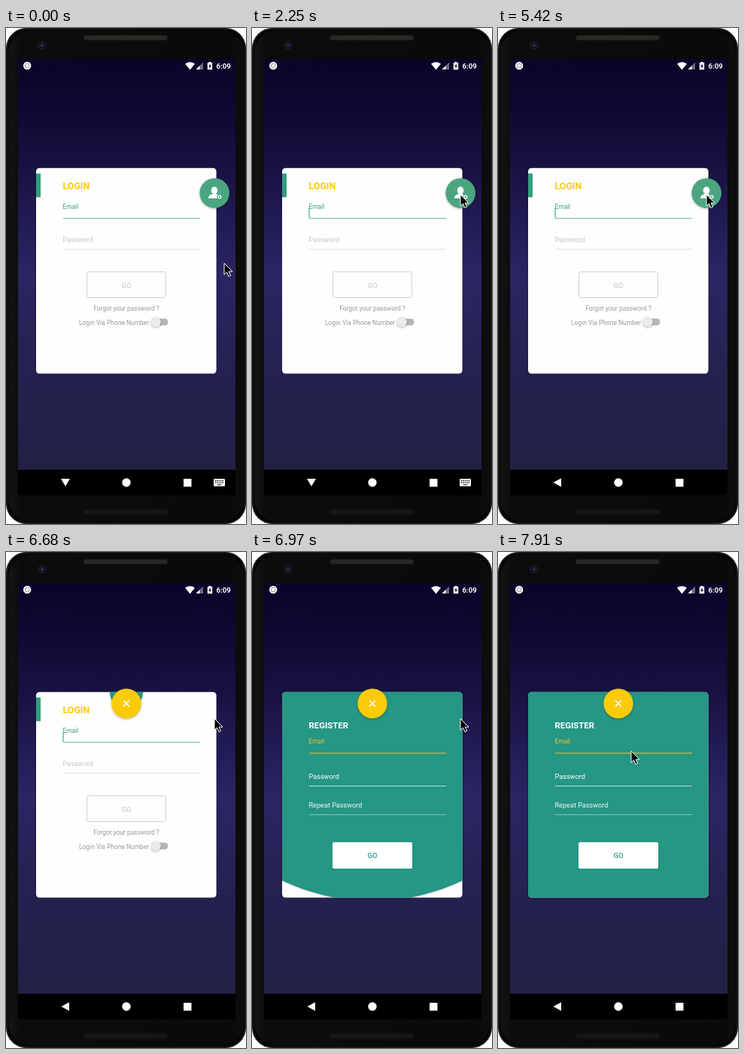
An HTML page for the animation above (8 s loop, 319x658 px).

```html
<!DOCTYPE html>
<html lang="en">
<head>
<meta charset="utf-8">
<title>Login and register</title>
<style>
  html, body { margin: 0; width: 100%; height: 100%; overflow: hidden; background: #fff; }
  svg { display: block; width: 100%; height: 100%; }
  text { font-family: Roboto, sans-serif; font-size: 9.15px; }
  .bold { font-weight: 700; }
  .mid { text-anchor: middle; }
  .small { font-size: 8.45px; fill: #999; }
  .card { filter: drop-shadow(0 .8px 1px rgba(0, 0, 0, .3)); }
  .fab { filter: drop-shadow(0 1.5px 1.5px rgba(0, 0, 0, .3)); }
</style>
</head>
<body>
<svg viewBox="0 0 319 658">
  <defs>
    <linearGradient id="sky" x2="0" y2="1">
      <stop offset="0" stop-color="#090528"/>
      <stop offset=".1" stop-color="#0c082f"/>
      <stop offset=".25" stop-color="#171140"/>
      <stop offset=".38" stop-color="#201a52"/>
      <stop offset=".52" stop-color="#2a2563"/>
      <stop offset=".75" stop-color="#252150"/>
      <stop offset="1" stop-color="#222044"/>
    </linearGradient>
    <linearGradient id="bezel">
      <stop offset="0" stop-color="#141414"/>
      <stop offset=".05" stop-color="#0c0c0c"/>
      <stop offset=".95" stop-color="#0a0a0a"/>
      <stop offset="1" stop-color="#0e0e0e"/>
    </linearGradient>
    <clipPath id="reveal"><circle id="spot" cx="160" cy="186" r="0"/></clipPath>
  </defs>

  <!-- phone -->
  <rect width="319" height="658" rx="27" fill="#060606"/>
  <rect x="1" y="1" width="317" height="656" rx="26" fill="none" stroke="#2a2a2a"/>
  <rect x="3" y="3.500" width="313" height="651" rx="30" fill="url(#bezel)"/>
  <g stroke="#141210">
    <rect x="103" y="9.500" width="112" height="7" rx="3.500" fill="#292623"/>
    <rect x="103" y="639" width="112" height="6" rx="3" fill="#181716"/>
  </g>
  <circle cx="48" cy="23" r="5" fill="#12121e" stroke="#22222c"/>
  <circle cx="48" cy="23" r="2" fill="#2b2f62"/>
  <rect x="16" y="41" width="289" height="545" fill="url(#sky)"/>
  <rect x="16" y="586" width="289" height="34"/>

  <!-- status bar -->
  <g fill="#fff">
    <circle cx="28.200" cy="50" r="5.200"/>
    <circle cx="28.200" cy="50" r="2.900" fill="none" stroke="#8e8ca0"/>
    <path d="M238 47.600Q244.500 42.800 251 47.600L244.500 55.500Z"/>
    <path d="M262 45.500V55H252.500Z" opacity=".4"/>
    <path d="M257.500 50V55H252.500Z"/>
    <path d="M267.800 46H269.600V45H272.400V46H274.200V55.300H267.800Z"/>
    <path d="M271.600 47.300L269.200 51.200H270.600V54L272.900 50H271.600Z" fill="#0b0630"/>
    <text x="279.600" y="53.900" class="bold" style="font-size:9.6px">6:09</text>
  </g>

  <!-- navigation bar -->
  <g fill="#fff">
    <g id="typing">
      <path d="M73 598H85L79 608Z"/>
      <rect x="276" y="598" width="15" height="10" rx="1.200"/>
      <path d="M278 600.700H289M278 603.200H289" stroke="#000" stroke-width="1.300" stroke-dasharray="1.4 1"/>
      <path d="M280.500 606H286.500" stroke="#000"/>
    </g>
    <path id="back" d="M73.500 603L84 597.300V608.700Z"/>
    <circle cx="160" cy="603" r="5.700"/>
    <rect x="236" y="598" width="10.500" height="10.500" rx=".5"/>
  </g>

  <!-- login -->
  <g class="card"><rect x="40" y="185.700" width="239.600" height="272.800" rx="4.500" fill="#fefefe"/></g>
  <rect x="40" y="193" width="6" height="31.500" fill="#2fa07e"/>
  <text x="75.500" y="214.300" class="bold" fill="#fcca10" style="font-size:12.4px">LOGIN</text>
  <text x="75.500" y="239.800" fill="#35a080" style="font-size:8.3px">Email</text>
  <path d="M76 252.500H258" stroke="#6cb8a0"/>
  <path id="caret" d="M76 239V252" stroke="#35a080" stroke-width="1.100"/>
  <g fill="#c3c3c3">
    <text x="75.500" y="284.300">Password</text>
    <text x="160" y="344.700" class="mid" style="font-size:9.4px">GO</text>
  </g>
  <path d="M76 293.500H258" stroke="#dedede"/>
  <rect x="107.500" y="323.500" width="105" height="34" rx="2" fill="none" stroke="#cfcfcf"/>
  <text x="160" y="374.800" class="mid small">Forgot your password ?</text>
  <text x="97" y="393.700" class="small">Login Via Phone Number</text>
  <rect x="197" y="385.500" width="18.500" height="9" rx="4.500" fill="#b5b5b5"/>
  <circle cx="199.200" cy="390" r="6.500" fill="#ebebeb" class="fab"/>
  <g id="userFab">
    <circle cx="277.200" cy="219" r="19.800" fill="#4ba680" class="fab"/>
    <g fill="#fff">
      <ellipse cx="277" cy="215.500" rx="4.300" ry="4.900"/>
      <path d="M268.800 226Q269 221.500 275 220H279Q283 221 284 226Z"/>
      <circle cx="284" cy="224" r="2.200" stroke="#4ba680" stroke-width="3"/>
      <circle cx="284" cy="224" r="1.900" fill="#4ba680" stroke="#fff" stroke-width="1.200"/>
    </g>
  </g>

  <!-- register -->
  <g class="card"><g clip-path="url(#reveal)">
    <rect x="40" y="185.700" width="239.600" height="272.800" rx="4.500" fill="#269685"/>
    <text x="75.500" y="233.500" class="bold" fill="#fff" style="font-size:11.4px">REGISTER</text>
    <text x="75.500" y="254.200" fill="#f3c22c" style="font-size:8.3px">Email</text>
    <path d="M76 266.800H258" stroke="#d6b440" stroke-width="1.300"/>
    <text x="75.500" y="301.300" fill="#fff">Password</text>
    <text x="75.500" y="339.300" fill="#f0f8f6">Repeat Password</text>
    <path d="M76 310.500H258" stroke="#b4dad3"/>
    <path d="M76 348.500H258" stroke="#82c2b8"/>
    <rect x="107" y="385" width="106" height="35" rx="2" fill="#fff"/>
    <text x="160" y="406" class="mid" fill="#269685" style="font-size:9.4px;font-weight:500">GO</text>
  </g></g>
  <g id="closeFab">
    <circle r="19.700" fill="#fccb08" class="fab"/>
    <path d="M-4 -4L4 4M4 -4L-4 4" stroke="#fff" stroke-width="1.700"/>
  </g>

  <path id="pointer" d="M0 0V15.200L3.500 12L6 17.600L8.600 16.500L6.200 11.100H11Z" stroke="#fff" stroke-linejoin="round"/>
</svg>
<script>
const LOOP = 8000;
const at = (x, y) => `translate(${x}px, ${y}px)`;

// Holds each value until the time of the next step.
function hold(id, prop, steps) {
  const frames = steps.map(([time, value]) =>
    ({ offset: time / LOOP, [prop]: value, easing: "step-end" }));
  frames.push({ offset: 1, [prop]: steps.at(-1)[1] });
  document.getElementById(id).animate(frames, { duration: LOOP, iterations: Infinity });
}

// Samples a decelerating quadratic curve in evenly timed steps.
function glide(start, end, count, from, bend, to) {
  return Array.from({ length: count }, (_, i) => {
    const p = 1 - (1 - (i + 1) / count) ** 1.55;
    const [x, y] = [0, 1].map(k =>
      (1 - p) ** 2 * from[k] + 2 * p * (1 - p) * bend[k] + p * p * to[k]);
    return [start + (end - start) * i / (count - 1), at(Math.round(x), Math.round(y))];
  });
}

const rest = [277, 221];
hold("pointer", "transform", [
  [0, at(290, 312)],
  ...glide(960, 1480, 10, [290, 312], [316, 235], rest),
  ...glide(7150, 7910, 13, rest, [230, 246], [177, 264]),
]);
hold("caret", "opacity", [0, 300, 780, 1250, 1770, 2250, 2730, 3630].map((t, i) => [t, i % 2]));
hold("typing", "opacity", [[0, 1], [5420, 0]]);
hold("back", "opacity", [[0, 0], [5420, 1]]);
hold("userFab", "opacity", [[0, 1], [6140, 0]]);
hold("closeFab", "opacity", [[0, 0], [6140, 1]]);
hold("closeFab", "transform", [
  [0, at(277, 219)], [6140, at(264, 227)], [6320, at(215, 231)], [6500, at(160, 201)],
]);
hold("spot", "r", [[0, "0px"], [6680, "22px"], [6860, "130px"], [6970, "277px"], [7150, "400px"]]);
</script>
</body>
</html>
```
